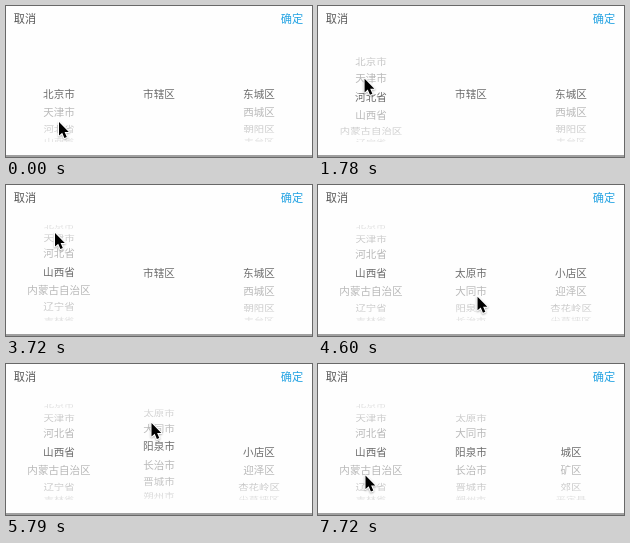
These frames come from a looping animation (306 px wide and 151 px high, 8000 ms). An HTML page with a canvas:

```html
<!DOCTYPE html>
<html lang="zh-CN">
<head>
<meta charset="utf-8">
<style>
html, body { margin: 0; width: 100%; height: 100%; overflow: hidden; background: #fefefe; }
canvas { display: block; width: 306px; height: 151px; }
</style>
</head>
<body>
<canvas></canvas>
<script>
const LOOP = 8000, TICK = 145;
const MID = 88, REACH = 47.5, RADIUS = 60, ANGLE = Math.PI / 10, DEPTH = 667, DRAG = 23.4;
const FONT = '"Noto Sans CJK SC", "Noto Sans CJK", sans-serif';

const provinces = '北京市 天津市 河北省 山西省 内蒙古自治区 辽宁省 吉林省 黑龙江省'.split(' ');
const cities = ['市辖区'];
const shanxi = '太原市 大同市 阳泉市 长治市 晋城市 朔州市 晋中市'.split(' ');
const districts = ['东城区 西城区 朝阳区 丰台区 石景山区', '小店区 迎泽区 杏花岭区 尖草坪区 万柏林区',
  '城区 矿区 郊区 平定县 盂县'].map(s => s.split(' '));

// Pointer moves: ease is the power of the ease-out, swing bends the path
const home = { x: 53, y: 116 };
const moves = [
  { start: 1200, steps: 7, x: 46, y: 69, ease: 2 },
  { start: 2380, steps: 3, x: 49, y: 48, ease: 0.5 },
  { start: 4310, steps: 4, x: 155, y: 112, ease: 4, swingX: 7 },
  { start: 5200, steps: 5, x: 145.5, y: 59, ease: 1 },
  { start: 7270, steps: 4, x: 47.5, y: 111.5, ease: 2, swingY: 30 }
];

const canvas = document.querySelector('canvas');
const ctx = canvas.getContext('2d');
const ratio = window.devicePixelRatio || 1;
canvas.width = 306 * ratio;
canvas.height = 151 * ratio;

// Share of a move done at time t, advancing once per tick
function progress(t, start, steps) {
  return t < start ? 0 : Math.min(1, (Math.floor((t - start) / TICK) + 1) / steps);
}

function pointerAt(t) {
  let { x, y } = home;
  for (const m of moves) {
    const p = progress(t, m.start, m.steps);
    const e = 1 - (1 - p) ** m.ease, bend = Math.sin(Math.PI * p);
    x += (m.x - x) * e + (m.swingX || 0) * bend;
    y += (m.y - y) * e + (m.swingY || 0) * bend;
  }
  return { x, y };
}

function settle(t, start, from, to) {
  return to + (from - to) * (1 - progress(t, start, 3));
}

function label(text, x, y, size, color) {
  ctx.font = size + 'px ' + FONT;
  ctx.fillStyle = color;
  ctx.fillText(text, x, y + size * 0.38);
}

function wheel(items, x, row) {
  items.forEach((text, i) => {
    const a = (i - row) * ANGLE;
    if (Math.abs(a) > 1.15) return;
    const zoom = DEPTH / (DEPTH + RADIUS * (1 - Math.cos(a)));
    ctx.save();
    ctx.translate(x, MID + RADIUS * Math.sin(a) * zoom);
    ctx.scale(zoom, zoom * Math.cos(a));
    label(text, 0, 0, 10.6, Math.abs(a) < ANGLE / 2 ? '#6c6c6c' : '#b8b8b8');
    ctx.restore();
  });
}

function fade() {
  const g = ctx.createLinearGradient(0, MID - REACH, 0, MID + REACH);
  [[0, 0.6], [0.25, 0], [0.75, 0], [1, 0.6]].forEach(([at, alpha]) => g.addColorStop(at, `rgba(254,254,254,${alpha})`));
  ctx.fillStyle = g;
  ctx.fillRect(0, MID - REACH, 306, 2 * REACH);
}

function wheels(t, y) {
  const row1 = t < 3720 ? (home.y - y) / DRAG : settle(t, 3720, 3.08, 3);
  const row2 = t < 5200 ? 0 : t < 6540 ? (112 - y) / DRAG + 0.05 : settle(t, 6540, 2.3, 2);
  const stage = t < 4010 ? 0 : t < 6830 ? 1 : 2;
  ctx.save();
  ctx.beginPath();
  ctx.rect(0, MID - REACH, 306, 2 * REACH);
  ctx.clip();
  wheel(provinces, 53, row1);
  wheel(stage ? shanxi : cities, 153, row2);
  wheel(districts[stage], 253, 0);
  fade();
  ctx.restore();
}

const arrow = new Path2D('M0 0V13.6L3.2 10.7L5.4 16L7.8 15L5.6 9.9H9.8Z');

function cursor(x, y) {
  ctx.translate(x, y);
  ctx.lineWidth = 2;
  ctx.lineJoin = 'round';
  ctx.strokeStyle = '#fff';
  ctx.shadowColor = 'rgba(0,0,0,0.3)';
  ctx.shadowBlur = 2 * ratio;
  ctx.shadowOffsetY = ratio;
  ctx.stroke(arrow);
  ctx.shadowColor = 'transparent';
  ctx.fillStyle = '#000';
  ctx.fill(arrow);
}

function draw(t) {
  const { x, y } = pointerAt(t);
  ctx.setTransform(ratio, 0, 0, ratio, 0, 0);
  ctx.fillStyle = '#fefefe';
  ctx.fillRect(0, 0, 306, 151);
  ctx.textAlign = 'center';
  wheels(t, y);
  label('取消', 19, 13, 11.2, '#585858');
  label('确定', 286, 13, 11.2, '#22a2e2');
  ctx.fillStyle = '#a0a0a0';
  ctx.fillRect(0, 149, 306, 2);
  cursor(x, y);
}

function tick(now) {
  draw(now % LOOP);
  requestAnimationFrame(tick);
}
requestAnimationFrame(tick);
</script>
</body>
</html>
```
